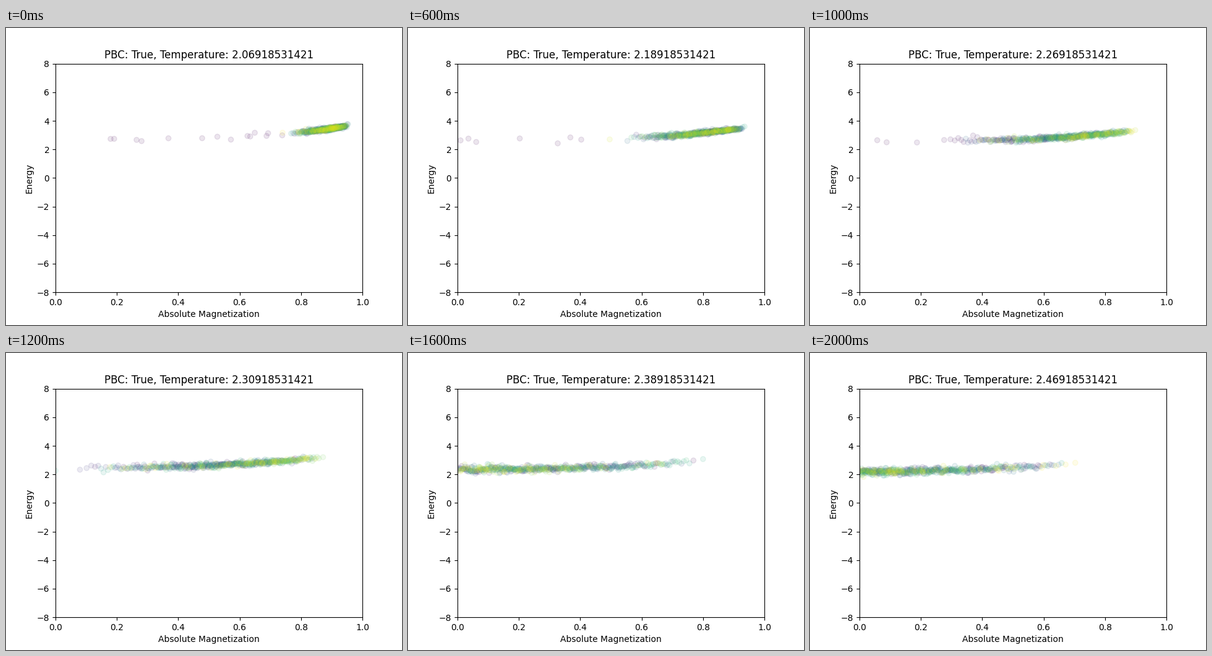
Animation of 640 by 480 pixels, one loop 2100 ms. Source, as a matplotlib script:

```python
import numpy as np
import matplotlib.pyplot as plt
from matplotlib.animation import FuncAnimation

FRAMES = 21
SAMPLES = 500
T0, DT = 2.06918531421, 0.02
ORDERED = 12  # steps before the magnetization spreads down to zero


def bump(k, center, width):
    return np.exp(-((k - center) / width) ** 2)


def m_range(k):
    low = 0.74 * max(0, 1 - (k / ORDERED) ** 1.6)
    high = 0.953 - 0.25 * (k / (FRAMES - 1)) ** 2.2
    return low, high


def quantile(k, p):
    """Magnetization below which a share p of the samples lies."""
    low, high = m_range(k)
    shape = 1 + 2.4 / (1 + np.exp(k - 13.3))
    return low + (high - low) * (1 - np.sqrt(1 - p)) ** (1 / shape)


def energy(k, m, rng):
    t = k / (FRAMES - 1)
    mean = 2.75 - 0.55 * t ** 1.3 + 1.1 * m ** (4 - 2 * t)
    return mean + rng.normal(size=m.size) * (0.12 - 0.08 * m ** 2)


def chain(k, rng):
    """Correlated walk, reshaped to the spread expected at step k."""
    phi = 0.4 + 0.4 * bump(k, 14, 6)
    kick = rng.normal(size=SAMPLES) * np.sqrt(1 - phi ** 2)
    z = np.zeros(SAMPLES)
    for i in range(1, SAMPLES):
        z[i] = phi * z[i - 1] + kick[i]
    z += bump(k, 11, 4) * np.linspace(-0.8, 0.8, SAMPLES)
    rank = z.argsort().argsort() / (SAMPLES - 1)
    return quantile(k, rank)


def warmup(k, rng):
    """First samples, climbing from disorder to the ordered state."""
    count = max(0, round(14 * (1 - k / ORDERED)))
    low, _ = m_range(k)
    return low * np.sort(rng.random(count)) ** (0.4 + 0.2 * k)


def samples(k):
    rng = np.random.default_rng(40 + k)
    m = chain(k, rng)
    start = warmup(k, rng)
    m[:start.size] = start
    return np.column_stack([m, energy(k, m, rng)])


fig, ax = plt.subplots(figsize=(6.4, 4.8), dpi=100)
ax.set(xlim=(0, 1), ylim=(-8, 8),
       xlabel="Absolute Magnetization", ylabel="Energy")
title = ax.set_title("")
dots = ax.scatter(np.zeros(SAMPLES), np.zeros(SAMPLES),
                  c=np.arange(SAMPLES), cmap="viridis", alpha=0.1)


def update(k):
    dots.set_offsets(samples(k))
    title.set_text(f"PBC: True, Temperature: {T0 + DT * k:.11f}")
    return dots, title


anim = FuncAnimation(fig, update, frames=FRAMES, interval=100,
                     repeat=True, repeat_delay=0)
plt.show()
```
